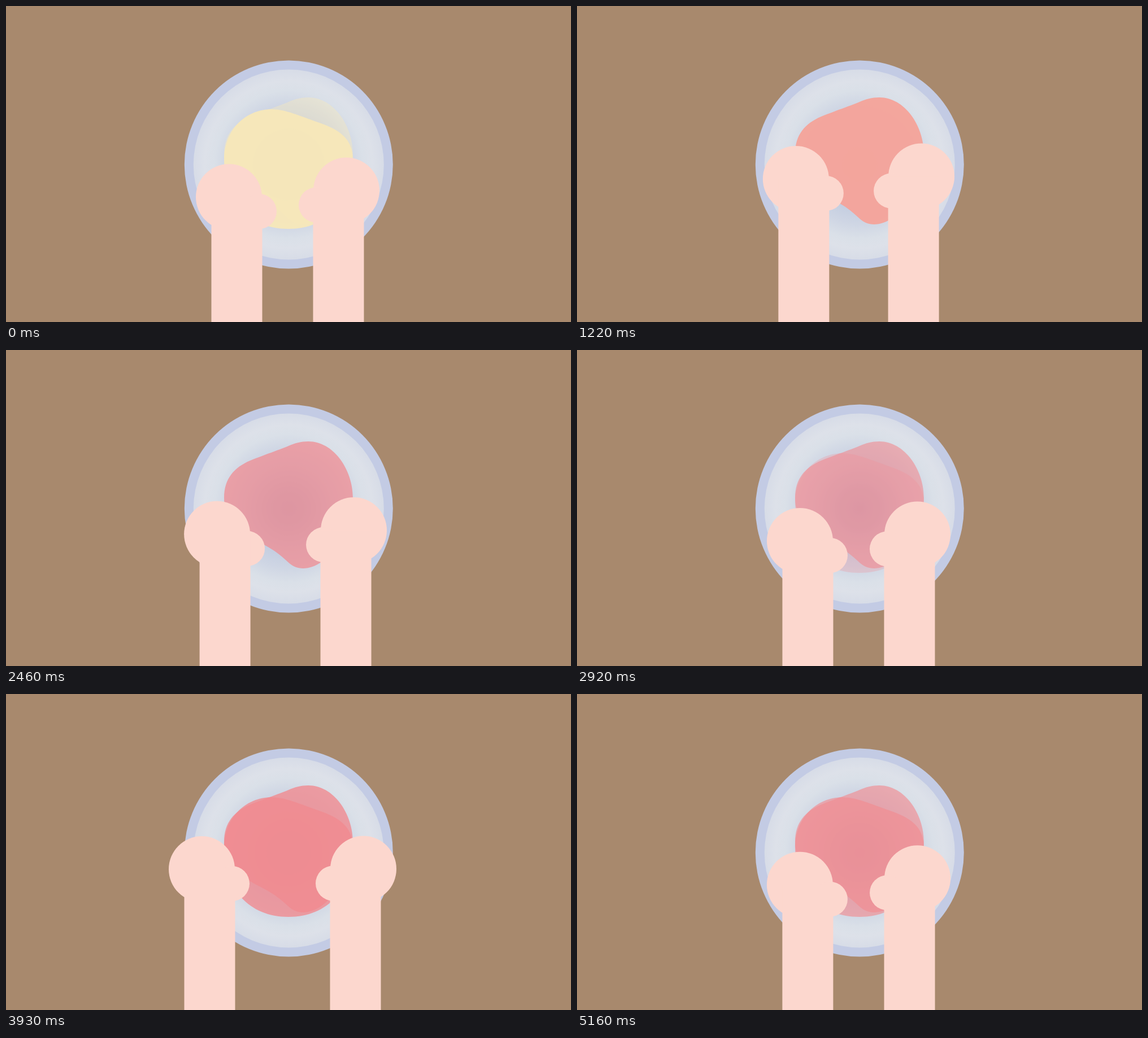
Write an HTML page with a canvas that moves like this. It is 1000 px wide and 560 px high and loops after 5.24 s.

```html
<!DOCTYPE html>
<html lang="en">
<head>
<meta charset="utf-8">
<title>Kneading</title>
<style>
  html, body { margin: 0; width: 100%; height: 100%; overflow: hidden; background: #a8896d; }
  canvas { display: block; width: 1000px; height: 560px; }
</style>
</head>
<body>
<canvas id="stage" width="1000" height="560"></canvas>
<script>
const ctx = document.getElementById('stage').getContext('2d');
const LOOP = 5240;
const MIRROR = 6050; // the knead plays forward, then back around half this time
const SKIN = '#fcd7ce';
const YELLOW = [248, 232, 185];
const RED = [242, 139, 144];

const roundDough = new Path2D(
  'M386 272C386 222 422 183 470 183C495 183 520 195 552 206' +
  'C590 219 614 235 614 272C614 345 570 395 500 395C430 395 386 345 386 272Z');
const foldedDough = new Path2D(
  'M386 262C386 228 404 208 432 196C462 184 478 179 500 170' +
  'C511 165 522 162 535 162C580 162 614 212 614 262' +
  'C614 320 570 387 526 387C504 387 500 373 475 356C440 332 386 322 386 262Z');

const linear = u => u;
const easeOut = u => 1 - (1 - u) * (1 - u);
const easeInOut = u => u * u * (3 - 2 * u);
const mix = (a, b, u) => a + (b - a) * u;

// Each stop: time, values..., easing of the stretch that leads to it
const leftMove = [
  [860, [0, 0]],
  [1500, [-12, -54], easeInOut],
  [1925, [-40, -49.5], linear],
  [2115, [-48, -28], easeOut],
  [2750, [0, 0], easeInOut]
];
const rightMove = [
  [860, [0, 0]],
  [1500, [12, -42], easeInOut],
  [1925, [30, -34], linear],
  [2115, [30, -17], easeOut],
  [2750, [0, 0], easeInOut]
];
const foldedAlpha = [
  [0, [0.4]],
  [700, [1], easeInOut],
  [1220, [0.99], linear],
  [1760, [0.94], linear],
  [2460, [0.73], linear],
  [3000, [0.6], easeOut],
  [3460, [0.6], linear],
  [4200, [0.88], easeInOut],
  [4480, [0.83], linear],
  [5160, [0.64], easeOut]
];
const roundAlpha = [
  [0, [0.94]],
  [800, [0], easeInOut],
  [2600, [0], linear],
  [3300, [0.6], easeInOut],
  ...foldedAlpha.slice(6)
];
const doughColor = [
  [0, YELLOW],
  [1700, RED, linear]
];

function valueAt(stops, t) {
  if (t <= stops[0][0]) return stops[0][1];
  for (let i = 1; i < stops.length; i++) {
    const [end, to, ease] = stops[i];
    if (t <= end) {
      const [start, from] = stops[i - 1];
      const u = ease((t - start) / (end - start));
      return from.map((v, k) => mix(v, to[k], u));
    }
  }
  return stops[stops.length - 1][1];
}

function disc(x, y, r, fill) {
  ctx.fillStyle = fill;
  ctx.beginPath();
  ctx.arc(x, y, r, 0, Math.PI * 2);
  ctx.fill();
}

const glaze = ctx.createRadialGradient(500.3, 281, 0, 500.3, 281, 168.5);
[
  [0, '#a9b4d0'], [0.2, '#b1bdd6'], [0.44, '#c3cde0'], [0.63, '#cfd6e4'],
  [0.78, '#dae0e8'], [0.88, '#dde1e9'], [1, '#d7dce7']
].forEach(([at, color]) => glaze.addColorStop(at, color));

function drawDough(path, alpha, color) {
  ctx.globalAlpha = alpha;
  ctx.fillStyle = color;
  ctx.fill(path);
  ctx.globalAlpha = 1;
}

// side is 1 when the thumb points right, -1 when it points left
function drawHand(x, y, side) {
  disc(x, y, 58.5, SKIN);
  disc(x + side * 53.5, y + 25.5, 31, SKIN);
  ctx.fillRect(x + side * 14 - 45, y, 90, 600 - y);
}

function draw(t) {
  ctx.fillStyle = '#a8896d';
  ctx.fillRect(0, 0, 1000, 560);
  disc(500.3, 281, 184.5, '#c3cbe4');
  disc(500.3, 281, 168.5, glaze);

  const color = `rgb(${valueAt(doughColor, t).map(Math.round).join(',')})`;
  drawDough(foldedDough, valueAt(foldedAlpha, t)[0], color);
  drawDough(roundDough, valueAt(roundAlpha, t)[0], color);

  const k = Math.min(t, MIRROR - t);
  const [lx, ly] = valueAt(leftMove, k);
  const [rx, ry] = valueAt(rightMove, k);
  drawHand(394.5 + lx, 338.5 + ly, 1);
  drawHand(602.5 + rx, 327 + ry, -1);
}

let begin;
function tick(now) {
  if (begin === undefined) begin = now;
  draw((now - begin) % LOOP);
  requestAnimationFrame(tick);
}
draw(0);
requestAnimationFrame(tick);
</script>
</body>
</html>
```
